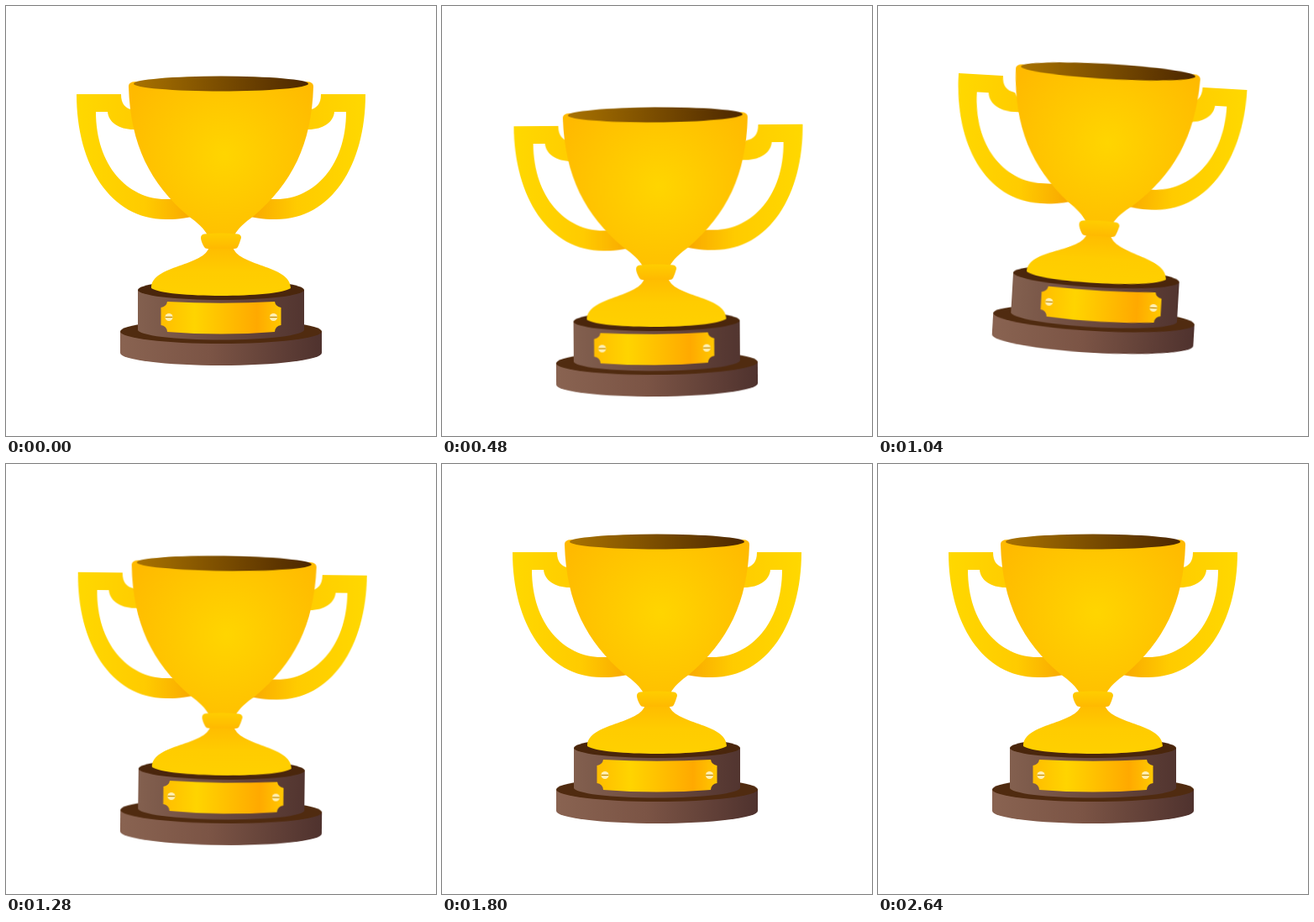
Write an HTML page that moves like this. It is 512 px wide and 512 px high and loops after 2.8 s.

```html
<!DOCTYPE html>
<html lang="en">
<head>
<meta charset="utf-8">
<title>Trophy</title>
<style>
  html, body { margin: 0; width: 100%; height: 100%; overflow: hidden; background: #fff; }
  svg { display: block; width: 100%; height: 100%; }

  .jump, .tilt, .handles, .plate, .shine, .spark {
    --sine: cubic-bezier(.37, 0, .63, 1);
    animation: 2800ms var(--sine) infinite;
  }
  .jump { animation-name: jump; }
  .tilt { animation-name: tilt; transform-origin: 256px 405px; }
  .handles { animation-name: handles; }
  .plate { animation-name: plate; }
  .shine { animation-name: shine; animation-timing-function: linear; }
  .spark { animation-name: spark; }

  @keyframes jump {
    0% { transform: translateY(0); }
    14.286% { transform: translateY(42px); animation-timing-function: cubic-bezier(.6, 0, .4, 1); }
    28.571% { transform: translateY(-58.5px); }
    45.5% { transform: translateY(26px); animation-timing-function: cubic-bezier(.33, .15, .4, 1); }
    61.43%, 100% { transform: translateY(0); }
  }
  @keyframes tilt {
    0%, 15.714% { transform: rotate(0deg); }
    23.4% { transform: rotate(-4.6deg); }
    35.714% { transform: rotate(3.4deg); }
    50%, 100% { transform: rotate(0deg); }
  }
  /* Handles and plate slide in opposite directions to suggest a turn. */
  @keyframes handles {
    0%, 12.143% { transform: translateX(0); }
    22.857%, 25.714% { transform: translateX(7.8px); }
    38.571% { transform: translateX(-6px); }
    50%, 100% { transform: translateX(0); }
  }
  @keyframes plate {
    0%, 12.143% { transform: translateX(0); }
    22.857%, 25.714% { transform: translateX(-6.8px); }
    38.571% { transform: translateX(8px); }
    50%, 100% { transform: translateX(0); }
  }
  @keyframes shine {
    0%, 47.143% { transform: translateX(-120px); }
    61.43%, 100% { transform: translateX(180px); }
  }
  @keyframes spark {
    0%, 65.714% { transform: translate(332.5px, 123px) rotate(-45deg) scale(0); }
    80% { transform: translate(332.5px, 123px) rotate(0deg) scale(1); }
    94.286%, 100% { transform: translate(332.5px, 123px) rotate(45deg) scale(0); }
  }
</style>
</head>
<body>
<svg viewBox="0 0 512 512">
  <defs>
    <linearGradient id="wood">
      <stop offset="0" stop-color="#896351"/>
      <stop offset=".45" stop-color="#7b5445"/>
      <stop offset="1" stop-color="#4f322e"/>
    </linearGradient>
    <linearGradient id="drum">
      <stop offset="0" stop-color="#83604f"/>
      <stop offset=".5" stop-color="#6b493e"/>
      <stop offset="1" stop-color="#523530"/>
    </linearGradient>
    <linearGradient id="inside">
      <stop offset="0" stop-color="#a87200"/>
      <stop offset="1" stop-color="#4c2700"/>
    </linearGradient>
    <radialGradient id="gold" gradientUnits="userSpaceOnUse" cx="260" cy="177" r="130">
      <stop offset="0" stop-color="#ffd500"/>
      <stop offset="1" stop-color="#ffba00"/>
    </radialGradient>
    <linearGradient id="grip" gradientUnits="userSpaceOnUse" x1="84" y1="0" x2="220" y2="0">
      <stop offset="0" stop-color="#ffd800"/>
      <stop offset=".6" stop-color="#ffcb00"/>
      <stop offset="1" stop-color="#f9a900"/>
    </linearGradient>
    <linearGradient id="foot" x1="0" y1="0" x2="0" y2="1">
      <stop offset="0" stop-color="#ffbb00"/>
      <stop offset=".5" stop-color="#ffcc00"/>
      <stop offset="1" stop-color="#ffd000"/>
    </linearGradient>
    <linearGradient id="collar" x1="0" y1="0" x2="0" y2="1">
      <stop offset="0" stop-color="#ffcd00"/>
      <stop offset="1" stop-color="#ffb900"/>
    </linearGradient>
    <linearGradient id="label">
      <stop offset="0" stop-color="#ffbd00"/>
      <stop offset=".28" stop-color="#ffd400"/>
      <stop offset=".8" stop-color="#ffa900"/>
      <stop offset="1" stop-color="#ffc800"/>
    </linearGradient>
    <clipPath id="front">
      <path d="M147 95A109 8 0 0 0 365 95C364 165 340 212 295 250C284 258 276 265 272 273H240C236 265 228 258 217 250C172 212 148 165 147 95Z"/>
    </clipPath>
    <path id="handle" fill="url(#grip)" d="M84 105H137C137 117 142 122 152 124L166 147H152C134 147 122 138 121 126H107C107 190 145 230 190 230H206L232 248C212 254 200 254 190 254C125 254 84 190 84 105Z"/>
    <g id="screw">
      <circle r="4.6" fill="#fff0b4"/>
      <path d="M-4.4 0H4.4" stroke="#c99000" stroke-width="1.3"/>
    </g>
  </defs>

  <g class="jump">
    <g class="tilt">
      <path fill="url(#wood)" d="M136 387.500V413A120 15 0 0 0 376 413V387.500Z"/>
      <ellipse cx="256" cy="387.500" rx="120" ry="14.500" fill="#502b10"/>
      <path fill="url(#drum)" d="M157 338V385.500A99 12 0 0 0 355 385.500V338Z"/>
      <ellipse cx="256" cy="338" rx="99" ry="12" fill="#4a260c"/>

      <g class="plate">
        <path fill="url(#label)" d="M192 352Q256 355.500 320 352A8 8 0 0 0 327.500 359V380A8 8 0 0 0 320 388Q256 393 192 388A8 8 0 0 0 184.500 380V359A8 8 0 0 0 192 352Z"/>
        <use href="#screw" x="194" y="370.500"/>
        <use href="#screw" x="318.500" y="370.500"/>
      </g>

      <g class="handles">
        <use href="#handle"/>
        <use href="#handle" transform="matrix(-1 0 0 1 512 0)"/>
      </g>

      <path fill="url(#foot)" d="M242 286C238 310 173 308 173 336C190 348 322 348 339 336C339 308 274 310 270 286Z"/>
      <path fill="url(#gold)" d="M146 96C146 91 150 90 156 90H356C362 90 366 91 366 96C364 165 340 212 295 250C284 258 276 265 272 273H240C236 265 228 258 217 250C172 212 148 165 146 96Z"/>
      <ellipse cx="256" cy="92.500" rx="104" ry="9" fill="url(#inside)"/>
      <g clip-path="url(#front)">
        <path class="shine" fill="#fdf064" d="M201.500 94H239.500L254 286H215.500Z"/>
      </g>
      <path fill="url(#collar)" d="M236 271.500Q256 269.500 276 271.500Q280 272 280 276Q278 283 276 287Q275 289 272 289H240Q237 289 236 287Q232 280 232 276Q232 272 236 271.500Z"/>
    </g>
  </g>

  <path class="spark" fill="#fff" d="M0-34Q4-4 34 0Q4 4 0 34Q-4 4-34 0Q-4-4 0-34Z"/>
</svg>
</body>
</html>
```
